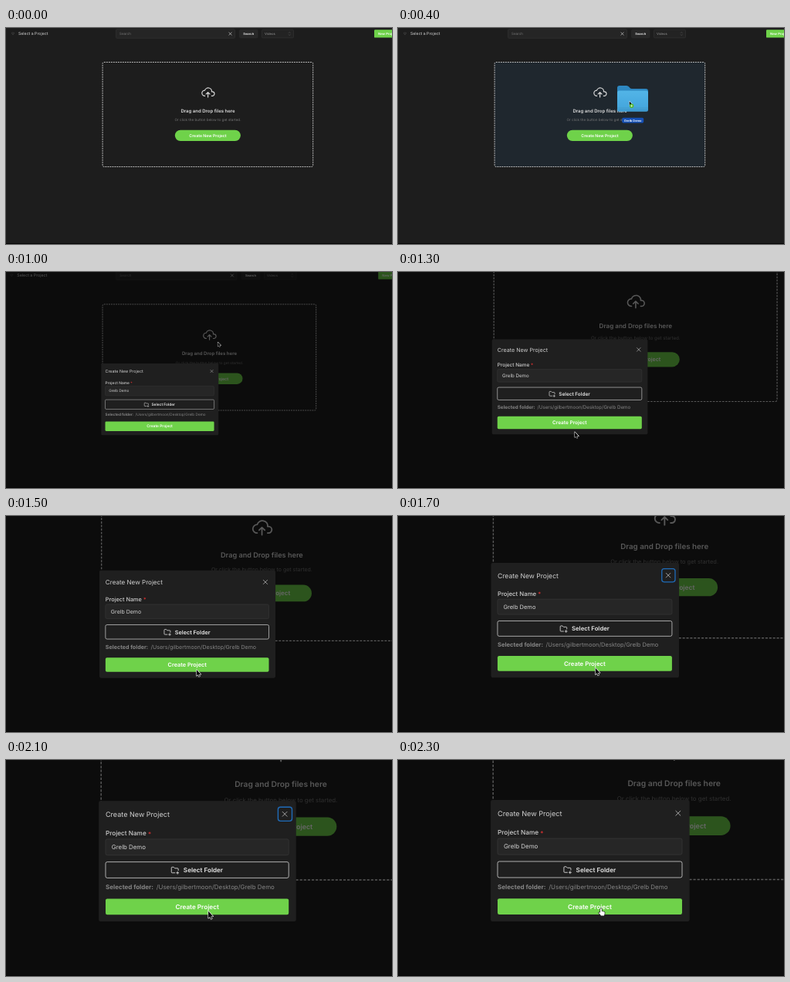
Animation of 500x281 px, one loop 2.4 s. Source, as an HTML page with a canvas:

```html
<!DOCTYPE html>
<html lang="en">
<head>
<meta charset="utf-8">
<title>Create a project</title>
<style>
html, body { margin: 0; width: 100%; height: 100%; overflow: hidden; background: #0b0b0b; }
canvas { display: block; width: 500px; height: 281px; }
</style>
</head>
<body>
<canvas id="stage"></canvas>
<script>
const W = 500, H = 281, LOOP = 2400, STEP = 100;
const FONT = 'Inter, "Liberation Sans", sans-serif';
const GREEN = '#6fd24a', BG = '#1d1d1d';
const PROJECT = 'Grelb Demo', USER = 'gilbertmoon';
const ZOOM = { start: 953, rate: 0.0046, amount: 0.73, x: 127.8, y: 215.2 };

const canvas = document.getElementById('stage');
const dpr = window.devicePixelRatio || 1;
canvas.width = Math.round(W * dpr);
canvas.height = Math.round(H * dpr);
const ctx = canvas.getContext('2d');

const icons = {
  cloud: new Path2D('M7 18a4.6 4.4 0 0 1 0-9a5 4.5 0 0 1 11 2h1a3.5 3.5 0 0 1 0 7h-1M9 15l3-3l3 3M12 12v8'),
  folderPlus: new Path2D('M12 19H5a2 2 0 0 1-2-2V6a2 2 0 0 1 2-2h4l3 3h7a2 2 0 0 1 2 2v3.5M16 19h6M19 16v6'),
  arrow: new Path2D('M0 0V16L3.6 12.7L6 18L8.4 17L6 11.8H11Z'),
  hand: new Path2D('M4 10V1.8a1.5 1.5 0 0 1 3 0V7l5.5 1.2q1.6.5 1.5 2.2q-.2 3.6-1.5 6.6H5.5Q3.5 13.5.6 11.2q-.6-2 1.4-1.8Z'),
  folderBack: new Path2D('M0 3a3 3 0 0 1 3-3h9q2 0 3.2 1.5l1.2 1.4q1 1.1 2.6 1.1H37a3 3 0 0 1 3 3V28H0Z')
};

// Pointer tip: time, x, y in unzoomed units
const route = [
  [0, 545, 8], [100, 476, 28], [200, 418, 58], [300, 352, 82], [400, 299.8, 95.5],
  [500, 278, 95], [600, 272.3, 93.2], [1000, 272.3, 93.2], [1100, 258, 130],
  [1200, 222, 185], [1300, 203, 210], [1500, 206, 205.2], [1700, 206.5, 204.4]
];

function pointerAt(t) {
  const i = route.findIndex(p => p[0] > t);
  if (i < 0) return route[route.length - 1].slice(1);
  const [a, b] = [route[i - 1], route[i]];
  const k = (t - a[0]) / (b[0] - a[0]);
  return [a[1] + (b[1] - a[1]) * k, a[2] + (b[2] - a[2]) * k];
}

function rect(x, y, w, h, r, fill, stroke, width = 0.6) {
  ctx.beginPath();
  ctx.roundRect(x, y, w, h, r);
  if (fill) { ctx.fillStyle = fill; ctx.fill(); }
  if (stroke) { ctx.strokeStyle = stroke; ctx.lineWidth = width; ctx.stroke(); }
}

function text(str, x, y, size, color, weight = 400, align = 'left') {
  ctx.font = `${weight} ${size}px ${FONT}`;
  ctx.textAlign = align;
  ctx.textBaseline = 'alphabetic';
  ctx.fillStyle = color;
  ctx.fillText(str, x, y + size * 0.36);
}

function line(points, color, width) {
  ctx.beginPath();
  points.forEach(([x, y], i) => i ? ctx.lineTo(x, y) : ctx.moveTo(x, y));
  ctx.strokeStyle = color;
  ctx.lineWidth = width;
  ctx.stroke();
}

function cross(x, y, r, color, width) {
  line([[x - r, y - r], [x + r, y + r]], color, width);
  line([[x + r, y - r], [x - r, y + r]], color, width);
}

function place(x, y, scale, draw) {
  ctx.save();
  ctx.translate(x, y);
  ctx.scale(scale, scale);
  ctx.lineCap = ctx.lineJoin = 'round';
  draw();
  ctx.restore();
}

function strokeIcon(path, x, y, scale, color, width) {
  place(x, y, scale, () => {
    ctx.strokeStyle = color;
    ctx.lineWidth = width;
    ctx.stroke(path);
  });
}

function drawHeader() {
  line([[7.3, 6.4], [8.2, 6], [9, 6.4], [9.8, 6], [10.7, 6.4], [9, 9], [7.3, 6.4]], '#555', 0.5);
  text('Select a Project', 16, 7.5, 5.2, '#d6d6d6');
  rect(142.5, 1.7, 154, 11.6, 1.2, '#252525', '#353535');
  text('Search', 147, 7.6, 4.5, '#747474');
  cross(290.5, 7.5, 1.9, '#d0d0d0', 0.7);
  rect(302.5, 2.2, 23.5, 10.6, 1.2, '#282828', '#303030');
  text('Search', 314.2, 7.5, 4.1, '#f0f0f0', 600, 'center');
  rect(331.5, 2.2, 41, 10.6, 1.2, '#232323', '#363636');
  text('Videos', 335, 7.5, 4.2, '#999');
  line([[366, 6.6], [367.2, 5.4], [368.4, 6.6]], '#666', 0.5);
  line([[366, 8.4], [367.2, 9.6], [368.4, 8.4]], '#666', 0.5);
  rect(477, 2.2, 40, 10.4, 1.2, GREEN);
  text('New Project', 482, 7.5, 4.2, '#fff', 600);
}

function drawDropZone(hot) {
  ctx.setLineDash([1.9, 1.1]);
  rect(125.1, 44.5, 272.6, 136, 1.8, hot ? '#1f272e' : null, '#dcdcdc', 0.85);
  ctx.setLineDash([]);
  strokeIcon(icons.cloud, 252, 74, 0.8, '#dcdcdc', 1.45);
  text('Drag and Drop files here', 261.5, 107.4, 6, '#dcdcdc', 600, 'center');
  text('Or click the button below to get started.', 261.5, 119.4, 4.6, '#777', 400, 'center');
  rect(218.8, 132.7, 85.1, 14.3, 7.15, GREEN);
  text('Create New Project', 261.5, 139.9, 5.2, '#fff', 600, 'center');
}

function drawModal(ring) {
  const x = 128.5, w = 139, h = 12.2, mid = x + w / 2;
  rect(123.3, 120.3, 149.8, 91.9, 1.4, '#1f1f1f');
  text('Create New Project', x, 130.5, 5.3, '#cfcfcf');
  if (ring) rect(259.4, 125, 10.6, 10.6, 1.8, null, '#1f6cba', 0.8);
  cross(264.5, 130.3, 1.9, '#c8c8c8', 0.45);

  text('Project Name', x, 145, 4.8, '#cfcfcf', 500);
  text('*', 160.7, 145.4, 4.6, '#e03131', 500);
  rect(x, 149.4, w, h, 1.3, '#262626', '#363636', 0.5);
  text(PROJECT, 133.1, 155.4, 4.62, '#cfcfcf');

  rect(x, 166.8, w, h, 1.3, null, '#d8d8d8', 0.45);
  strokeIcon(icons.folderPlus, 177.6, 169.6, 0.29, '#e4e4e4', 1.7);
  text('Select Folder', 187.6, 173, 4.75, '#e8e8e8', 600);

  text('Selected folder:', x, 185.9, 4.7, '#858585', 700);
  text(`/Users/${USER}/Desktop/${PROJECT}`, 167, 185.9, 4.63, '#858585');

  rect(x, 194.8, w, h, 1.3, GREEN);
  text('Create Project', mid, 200.9, 4.8, '#fff', 600, 'center');
}

function drawFolder(x, y) {
  place(x, y, 1, () => {
    ctx.globalAlpha = 0.94;
    ctx.fillStyle = '#2f8fca';
    ctx.fill(icons.folderBack);
    const face = ctx.createLinearGradient(0, 6, 0, 34);
    face.addColorStop(0, '#55b8ea');
    face.addColorStop(1, '#43a5dc');
    rect(0, 6.5, 40, 27.2, 2.5, face);
    line([[1, 31.8], [39, 31.8]], '#3593cb', 0.6);
    ctx.globalAlpha = 1;
    rect(6.2, 41.8, 28, 6.6, 1.6, '#1650b4');
    text(PROJECT, 20.2, 45.1, 4, '#fff', 600, 'center');
  });
}

function drawPointer(x, y, hand) {
  place(hand ? x - 1.9 : x, hand ? y - 2.2 : y, 0.33, () => {
    const path = hand ? icons.hand : icons.arrow;
    ctx.lineWidth = 2.2;
    ctx.strokeStyle = hand ? '#111' : '#f0f0f0';
    ctx.stroke(path);
    ctx.fillStyle = hand ? '#fff' : '#0a0a0a';
    ctx.fill(path);
  });
}

function drawBadge(x, y) {
  ctx.beginPath();
  ctx.arc(x, y, 2.7, 0, Math.PI * 2);
  ctx.fillStyle = '#4fb72f';
  ctx.fill();
  line([[x - 1.5, y], [x + 1.5, y]], '#fff', 0.6);
  line([[x, y - 1.5], [x, y + 1.5]], '#fff', 0.6);
}

function render(t) {
  // Critically damped spring zoom, softened while it is fast
  const tau = Math.max(0, (t - ZOOM.start) * ZOOM.rate);
  const scale = 1 + ZOOM.amount * (1 - (1 + tau) * Math.exp(-tau));
  const lag = Math.max(0, tau - 0.2);
  const blur = 0.9 * (lag * Math.exp(1 - lag)) ** 2;
  canvas.style.filter = blur > 0.1 ? `blur(${blur.toFixed(2)}px)` : 'none';

  const [px, py] = pointerAt(t);
  const dragging = t < 600;
  const open = Math.min(1, Math.max(0, (t - 600) / 200));

  ctx.setTransform(dpr, 0, 0, dpr, 0, 0);
  ctx.textRendering = 'geometricPrecision';
  ctx.fillStyle = BG;
  ctx.fillRect(0, 0, W, H);
  ctx.save();
  ctx.translate(ZOOM.x * (1 - scale), ZOOM.y * (1 - scale));
  ctx.scale(scale, scale);
  drawHeader();
  drawDropZone(dragging && px < 398);
  if (open) {
    ctx.fillStyle = `rgba(0,0,0,${0.6 * open})`;
    ctx.fillRect(-10, -10, W + 20, H + 20);
    ctx.globalAlpha = open;
    drawModal(t >= 1700 && t < 2200);
    ctx.globalAlpha = 1;
  }
  if (dragging) drawFolder(px - 15.8, py - 20.5);
  drawPointer(px, py, t >= 2200);
  if (dragging) drawBadge(px + 2.8, py + 5.8);
  ctx.restore();
  ctx.fillStyle = '#060606';
  ctx.fillRect(0, H - 1, W, 1);
}

const begin = performance.now();
function tick() {
  const t = (performance.now() - begin) % LOOP;
  render(Math.floor(t / STEP) * STEP);
  requestAnimationFrame(tick);
}
tick();
</script>
</body>
</html>
```
